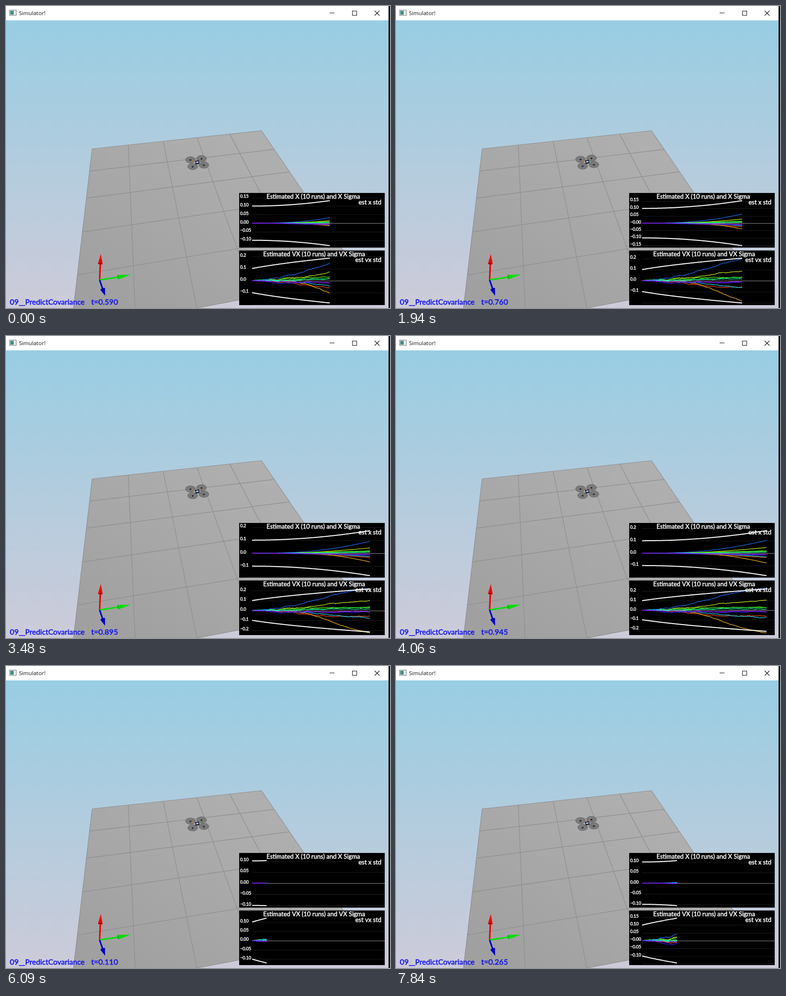
Write an HTML page with a canvas that moves like this. It is 802 px wide and 630 px high and loops after 8000 ms.

```html
<!DOCTYPE html>
<html lang="en">
<head>
<meta charset="utf-8">
<title>Simulator!</title>
<style>
html, body { margin: 0; width: 100%; height: 100%; overflow: hidden; background: #000; }
canvas { display: block; }
</style>
</head>
<body>
<canvas id="stage" width="802" height="630"></canvas>
<script>
const ctx = document.getElementById('stage').getContext('2d');
const LOOP = 8000;
const TICK = 96.6;          // ms between screen updates
const RESTART = 50;         // tick at which the simulation starts over
const RATE = 8.7e-5;        // simulated seconds per ms
const STEP = 0.005;         // simulated seconds per sample
const CELLS = 5;

function simTime(ms) {
  const tick = Math.floor(ms / TICK);
  const t = tick < RESTART
    ? 0.59 + RATE * TICK * tick
    : 0.0025 + RATE * TICK * (tick - RESTART);
  return Math.min(1, Math.round(t / STEP) * STEP);
}

// ---- estimator runs: eased velocity drift plus noise, position by integration ----
const times = Array.from({ length: Math.round(1 / STEP) + 1 }, (_, i) => i * STEP);

// Final drift, when it sets in, when it settles
const drifts = [
  [-0.06, 0.05, 0.65], [-0.24, 0.25, 1], [0.1, 0, 1], [0.03, 0, 0.6], [0.03, 0.1, 0.8],
  [0.016, 0.25, 0.6], [-0.08, 0.1, 1], [0.23, 0, 1], [-0.018, 0, 0.25], [-0.01, 0, 0.15]
];

function smoothstep(from, to, t) {
  const p = Math.min(1, Math.max(0, (t - from) / (to - from)));
  return p * p * (3 - 2 * p);
}

function seeded(seed) {
  return () => (seed = (seed * 16807) % 2147483647) / 2147483647;
}

const runColor = i => `hsl(${14 + 29 * i}, 80%, 50%)`;
const speeds = drifts.map(([end, from, to], i) => {
  const random = seeded(7919 * (i + 3));
  let wobble = 0;
  return times.map(t => {
    wobble = 0.88 * wobble + (random() - 0.5) * 0.0055;
    return end * smoothstep(from, to, t) + wobble * Math.min(1, t * 20);
  });
});
const positions = speeds.map(run => {
  let x = 0;
  return run.map(v => x += v * STEP);
});

const plots = [
  { top: 390, title: 'Estimated X (10 runs) and X Sigma', titleX: 544, legend: 'est x std',
    data: positions, sigma: times.map(t => 0.1 + 0.0915 * t * t), first: 406, last: 500, labelEnd: 499.5 },
  { top: 510, title: 'Estimated VX (10 runs) and VX Sigma', titleX: 537, legend: 'est vx std',
    data: speeds, sigma: times.map(t => Math.sqrt(0.01 + 0.0415 * t)), first: 526, last: 619.5, labelEnd: 618.5 }
];

// ---- drawing helpers ----
function path(points, close) {
  ctx.beginPath();
  points.forEach(([x, y]) => ctx.lineTo(x, y));
  if (close) ctx.closePath();
}
function line(color, width, ...points) {
  path(points);
  ctx.strokeStyle = color;
  ctx.lineWidth = width;
  ctx.stroke();
}
function fillShape(color, points) {
  path(points, true);
  ctx.fillStyle = color;
  ctx.fill();
}
function rect(color, x, y, w, h) {
  ctx.fillStyle = color;
  ctx.fillRect(x, y, w, h);
}
function ellipse(color, x, y, rx, ry, angle = 0) {
  ctx.beginPath();
  ctx.ellipse(x, y, rx, ry, angle, 0, Math.PI * 2);
  ctx.fillStyle = color;
  ctx.fill();
}
function text(string, x, y, size, color, align = 'left') {
  ctx.font = `${size}px Lato, sans-serif`;
  ctx.textAlign = align;
  ctx.fillStyle = ctx.strokeStyle = color;
  ctx.lineWidth = 0.5;
  ctx.fillText(string, x, y);
  ctx.strokeText(string, x, y);
}

function drawWindow() {
  rect('#fff', 0, 0, 802, 30);
  rect('#777', 7, 8, 15, 12);
  rect('#e8eeee', 8, 9, 13, 10);
  rect('#3f8f83', 9, 10, 7, 8);
  ctx.font = '11.6px "Open Sans", sans-serif';
  ctx.textAlign = 'left';
  ctx.fillStyle = '#111';
  ctx.fillText('Simulator!', 27, 19);
  line('#111', 1, [676, 14.5], [686, 14.5]);
  ctx.strokeRect(723.5, 10.5, 9, 9);
  line('#111', 1.1, [770, 10], [780, 20]);
  line('#111', 1.1, [780, 10], [770, 20]);
}

// Projective map from the unit square to a quad
function perspective([ax, ay], [bx, by], [cx, cy], [dx, dy]) {
  const ux = bx - cx, uy = by - cy, vx = dx - cx, vy = dy - cy;
  const sx = ax - bx + cx - dx, sy = ay - by + cy - dy;
  const det = ux * vy - vx * uy;
  const g = (sx * vy - vx * sy) / det, h = (ux * sy - sx * uy) / det;
  return (u, v) => {
    const w = 1 + g * u + h * v;
    return [
      (ax + (bx * (1 + g) - ax) * u + (dx * (1 + h) - ax) * v) / w,
      (ay + (by * (1 + g) - ay) * u + (dy * (1 + h) - ay) * v) / w
    ];
  };
}
const floorPoint = perspective([180, 298], [533.5, 260], [742, 565], [135, 680]);

function drawWorld() {
  const sky = ctx.createLinearGradient(0, 30, 0, 630);
  sky.addColorStop(0, '#98cde3');
  sky.addColorStop(1, '#cdcbd9');
  rect(sky, 0, 30, 802, 600);

  const shade = ctx.createLinearGradient(480, 260, 240, 630);
  shade.addColorStop(0, '#afafaf');
  shade.addColorStop(1, '#a0a0a0');
  fillShape(shade, [floorPoint(0, 0), floorPoint(1, 0), floorPoint(1, 1), floorPoint(0, 1)]);
  for (let i = 0; i <= CELLS; i++) {
    const p = i / CELLS;
    line('#8e8e8e', 1.2, floorPoint(0, p), floorPoint(1, p));
    line('#8e8e8e', 1.2, floorPoint(p, 0), floorPoint(p, 1));
  }
}

function drawDrone(t) {
  ctx.save();
  ctx.translate(0.3, 0.3 + 5.8 * (0.59 - t));
  const rotors = [[385, 320.5], [408, 318], [389.5, 334.5], [413, 331.5]];
  for (const [x, y] of rotors) {
    ellipse('#7a7a7a', x, y, 10.3, 6.6);
    ctx.setLineDash([2, 1]);
    ctx.strokeStyle = '#555';
    ctx.lineWidth = 1;
    ctx.stroke();
    ctx.setLineDash([]);
  }
  rotors.forEach(([x, y], i) => {
    line(i < 2 ? '#c87832' : '#666', 1, [399, 326], [x, y + 1]);
    ellipse('#14141e', x, y + 0.5, 1.8, 1.6);
    rect('#2a3c8c', x - 0.5, y + 0.5, 1.2, 1.6);
  });
  fillShape('#14182a', [[394.5, 323], [402.5, 321.5], [404, 328.5], [396, 330.5]]);
  fillShape('#a9bdec', [[396.5, 324.5], [401.5, 323.5], [402, 326.5], [397, 327.7]]);
  ctx.restore();
}

function drawArrow(color, dark, base, tip, half) {
  const angle = Math.atan2(tip[1] - base[1], tip[0] - base[0]);
  const nx = -Math.sin(angle) * half, ny = Math.cos(angle) * half;
  line(color, 3.2, [195, 571], base);
  fillShape(color, [[base[0] + nx, base[1] + ny], tip, [base[0] - nx, base[1] - ny]]);
  ellipse(dark, ...base, 1.6, half, angle);
}

function drawAxes() {
  ctx.save();
  ctx.translate(0.5, 0.5);
  drawArrow('#f00000', '#a80000', [196.5, 537], [197.5, 517], 4.8);
  drawArrow('#00e000', '#00b800', [234, 565], [259.5, 560], 4.6);
  drawArrow('#0000cc', '#0000a0', [201.5, 590], [206.5, 604], 5);
  ctx.restore();
}

function drawPlot({ top, title, titleX, legend, data, sigma, first, last, labelEnd }, t) {
  const count = Math.round(t / STEP) + 1;
  const reach = sigma[count - 1];
  const visible = data.flatMap(series => series.slice(0, count));
  const low = Math.min(-reach, ...visible), high = Math.max(reach, ...visible);
  const toY = v => first + (high - v) / (high - low) * (last - first);
  const trace = (series, color, width, sign = 1) => line(color, width,
    ...series.slice(0, count).map((v, i) => [514 + 275 * times[i], toY(sign * v)]));

  rect('#000', 487, top, 304, 114);
  ctx.save();
  ctx.beginPath();
  ctx.rect(487, top, 304, 114);
  ctx.clip();

  const coarse = reach > 0.17;
  const unit = coarse ? 0.1 : 0.05;
  for (let k = -4; k <= 4; k++) {
    const y = toY(k * unit);
    if (y < top + 5 || y > top + 114) continue;
    const gridY = Math.round(y) + 0.5;
    line(k ? '#1c1c1c' : '#8c8c8c', 1, [514, gridY], [791, gridY]);
    if (y > labelEnd) continue;
    // accumulated rounding shows zero as negative once ticks start at -0.15
    const minus = k < 0 || (k === 0 && !coarse && reach * 1.1 >= 0.15);
    text((minus ? '\u2212' : '') + Math.abs(k * unit).toFixed(coarse ? 1 : 2), 489, y + 0.5, 9, '#fff');
  }

  ctx.lineJoin = 'round';
  data.forEach((series, i) => trace(series, runColor(i), 1.3));
  trace(sigma, '#fff', 2);
  trace(sigma, '#fff', 2, -1);
  text(title, titleX, top + 12, 13, '#fff');
  text(legend, 784, top + 24, 13, '#fff', 'right');
  ctx.restore();
}

function drawStatus(t) {
  const blue = '#1010f0';
  text('09', 8, 623, 16, blue);
  rect(blue, 27, 624, 13, 1.5);
  text('PredictCovariance', 40, 623, 15.6, blue);
  text('t=' + t.toFixed(3), 178, 623, 16, blue);
}

function draw(t) {
  drawWorld();
  drawWindow();
  drawDrone(t);
  drawAxes();
  plots.forEach(plot => drawPlot(plot, t));
  drawStatus(t);
  rect('#000', 799, 0, 3, 630);
}

const start = performance.now();
let shown = -1;
function tick() {
  const t = simTime((performance.now() - start) % LOOP);
  if (t !== shown) draw(shown = t);
  requestAnimationFrame(tick);
}
tick();
</script>
</body>
</html>
```
